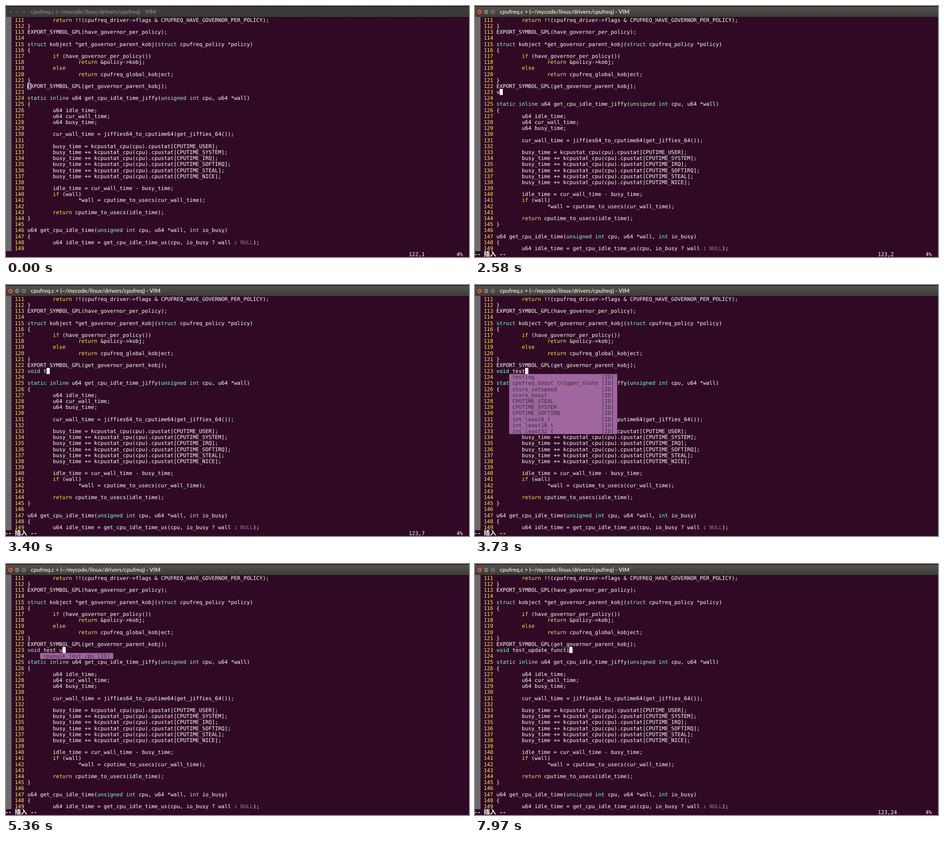
Recreate the animation shown at these times as an HTML page with a canvas. Size 1016x551 px, loop 8 s.

```html
<!DOCTYPE html>
<html lang="en">
<head>
<meta charset="utf-8">
<title>Editor session</title>
<style>
html, body { margin: 0; width: 100%; height: 100%; overflow: hidden; background: #300a24; }
canvas { display: block; }
</style>
</head>
<body>
<canvas id="stage" width="1016" height="551"></canvas>
<script>
const ctx = document.getElementById('stage').getContext('2d');
const LOOP = 8000, W = 1016, H = 551;
const CELL = 6.975, ROW = 13.184, LEFT = -1.8, TOP = 24, BASE = 10.9;
const TEXT_COL = 7, STATUS_ROW = 39, OPEN_AT = 1700;
const MONO = '11.585px "DejaVu Sans Mono", monospace';
const C = {
  bg: '#300a24', fg: '#ffffff', number: '#fce94f', keyword: '#fce94f',
  type: '#87ffcf', constant: '#9a6c9c', sign: '#6c6c6c',
  menu: '#a066a0', menuText: '#352c3a'
};

const code = `        return !!(cpufreq_driver->flags & CPUFREQ_HAVE_GOVERNOR_PER_POLICY);
}
EXPORT_SYMBOL_GPL(have_governor_per_policy);

struct kobject *get_governor_parent_kobj(struct cpufreq_policy *policy)
{
        if (have_governor_per_policy())
                return &policy->kobj;
        else
                return cpufreq_global_kobject;
}
EXPORT_SYMBOL_GPL(get_governor_parent_kobj);

static inline u64 get_cpu_idle_time_jiffy(unsigned int cpu, u64 *wall)
{
        u64 idle_time;
        u64 cur_wall_time;
        u64 busy_time;

        cur_wall_time = jiffies64_to_cputime64(get_jiffies_64());

        busy_time = kcpustat_cpu(cpu).cpustat[CPUTIME_USER];
        busy_time += kcpustat_cpu(cpu).cpustat[CPUTIME_SYSTEM];
        busy_time += kcpustat_cpu(cpu).cpustat[CPUTIME_IRQ];
        busy_time += kcpustat_cpu(cpu).cpustat[CPUTIME_SOFTIRQ];
        busy_time += kcpustat_cpu(cpu).cpustat[CPUTIME_STEAL];
        busy_time += kcpustat_cpu(cpu).cpustat[CPUTIME_NICE];

        idle_time = cur_wall_time - busy_time;
        if (wall)
                *wall = cputime_to_usecs(cur_wall_time);

        return cputime_to_usecs(idle_time);
}

u64 get_cpu_idle_time(unsigned int cpu, u64 *wall, int io_busy)
{
        u64 idle_time = get_cpu_idle_time_us(cpu, io_busy ? wall : NULL);
`.split('\n');

// Time of each key press, one per typed character
const typed = 'void test_update_functi';
const keys = [2530, 2730, 2840, 2910, 2980, 3400, 3480, 3600, 3670, 4430, 5310, 5410,
  5470, 5520, 5710, 5760, 6450, 6770, 6850, 7010, 7130, 7680, 7970];

const blinkOff = [[1500, 1700], [2320, 2530], [4980, 5310]];

const menus = [
  { from: 2780, to: 2980, col: 0, items: ['void'] },
  { from: 3530, to: 4470, col: 5, items: ['testing', 'cpufreq_boost_trigger_state',
    'store_setspeed', 'store_boost', 'CPUTIME_STEAL', 'CPUTIME_SYSTEM', 'CPUTIME_SOFTIRQ',
    'int_least8_t', 'int_least16_t', 'int_least32_t'] },
  { from: 4470, to: 5360, col: 5, items: ['cpumask_test_cpu', 'int_least8_t',
    'int_least16_t', 'int_least32_t', 'int_least64_t', 'uint_least8_t', 'uint_least16_t',
    'uint_least32_t', 'uint_least64_t', 'cpufreq_update_suspend_to_state_table'] },
  { from: 5360, to: 5410, col: 5, items: ['cpumask_test_cpu'] }
];

const colX = col => LEFT + col * CELL;
const rowY = row => TOP + row * ROW;
const within = (t, from, to) => t >= from && t < to;

function rect(x, y, w, h, color) {
  ctx.fillStyle = color;
  ctx.fillRect(x, y, w, h);
}

function put(text, col, row, color, font = MONO) {
  ctx.font = font;
  ctx.fillStyle = color;
  ctx.fillText(text, colX(col), rowY(row) + BASE);
}

function tokenColor(word) {
  if (/^(return|if|else)$/.test(word)) return C.keyword;
  if (/^(struct|static|inline|unsigned|int|void)$/.test(word)) return C.type;
  return word === 'NULL' ? C.constant : C.fg;
}

function drawCode(text, row) {
  put(String(111 + row), 3, row, C.number);
  for (const m of text.matchAll(/\w+|[^\w\s]+/g))
    put(m[0], TEXT_COL + m.index, row, tokenColor(m[0]));
}

function disc(x, y, r, fill, stroke) {
  ctx.beginPath();
  ctx.arc(x, y, r, 0, Math.PI * 2);
  ctx.fillStyle = fill;
  ctx.fill();
  ctx.lineWidth = 1;
  ctx.strokeStyle = stroke;
  ctx.stroke();
}

function path(points, color, width = 1) {
  ctx.beginPath();
  points.forEach(([x, y, move]) => move ? ctx.moveTo(x, y) : ctx.lineTo(x, y));
  ctx.lineWidth = width;
  ctx.strokeStyle = color;
  ctx.stroke();
}

function drawTitle(focused, modified) {
  const g = ctx.createLinearGradient(0, 0, 0, TOP);
  g.addColorStop(0, focused ? '#56544d' : '#3e3d39');
  g.addColorStop(1, focused ? '#3d3c38' : '#3a3935');
  rect(0, 0, W, TOP, g);
  rect(0, 0, W, 1.5, '#1f0e1a');

  const mark = focused ? '#3a3833' : '#55524b';
  const edge = focused ? '#34332f' : '#2c2b28';
  const gray = focused ? '#85827a' : '#403f3a';
  disc(10, 13, 5.5, focused ? '#e65f35' : gray, edge);
  disc(24.5, 13, 5.5, gray, edge);
  disc(39, 13, 5.5, gray, edge);
  path([[8, 11, 1], [12, 15], [12, 11, 1], [8, 15]], mark, 1.2);
  path([[22, 13, 1], [27, 13]], mark, 1.2);
  ctx.strokeRect(37, 11, 4, 4);

  ctx.font = 'bold 12.4px Lato, sans-serif';
  ctx.fillStyle = focused ? '#dfdbd2' : '#85817a';
  ctx.fillText(`cpufreq.c ${modified ? '+ ' : ''}(~/mycode/linux/drivers/cpufreq) - VIM`, 54.5, 17.2);
}

function drawMenu(menu) {
  const longest = Math.max(...menu.items.map(s => s.length));
  const col = TEXT_COL + menu.col;
  rect(colX(col - 1), rowY(13), (longest + 7) * CELL, menu.items.length * ROW, C.menu);
  menu.items.forEach((item, i) => {
    put(item, col, 13 + i, C.menuText);
    put('[ID]', col + longest + 1, 13 + i, C.menuText);
  });
}

function drawCursor(col, row, char, focused) {
  const x = Math.round(colX(TEXT_COL + col)), y = Math.round(rowY(row));
  if (focused) {
    rect(x, y, 7, 13.4, C.fg);
    if (char) put(char, TEXT_COL + col, row, C.bg);
  } else {
    ctx.strokeStyle = C.fg;
    ctx.lineWidth = 1;
    ctx.strokeRect(x + 0.5, y + 0.5, 7, 13);
  }
}

function drawPointer(t) {
  const p = Math.min(1, (t - 550) / 330);
  const rest = (1 - p) ** 2;
  const x = Math.round(372 + 40 * rest) - 0.5, y = Math.round(433 + 118 * rest);
  path([[x - 3, y - 6, 1], [x - 1, y - 6], [x, y - 5], [x, y + 5], [x - 1, y + 6], [x - 3, y + 6],
    [x + 3, y - 6, 1], [x + 1, y - 6], [x, y - 5], [x, y + 5, 1], [x + 1, y + 6], [x + 3, y + 6]], '#b9aeb6');
}

function draw(t) {
  const focused = t >= 690, editing = t >= OPEN_AT;
  const count = keys.filter(k => t >= k).length;
  const menu = menus.find(m => within(t, m.from, m.to));
  const lines = code.slice();
  if (editing) lines.splice(12, 0, typed.slice(0, count));

  rect(0, 0, W, H, C.bg);
  rect(0, TOP, colX(2), 39 * ROW, C.sign);
  lines.slice(0, 39).forEach(drawCode);
  drawTitle(focused, t >= 1740);

  if (menu) drawMenu(menu);
  if (!blinkOff.some(([a, b]) => within(t, a, b)))
    drawCursor(editing ? count : 0, editing ? 12 : 11, editing ? '' : 'E', focused);

  if (editing) {
    put('--', 0, STATUS_ROW, C.fg, 'bold ' + MONO);
    put('插入', 3, STATUS_ROW, C.fg, 'bold 13.6px "Noto Sans CJK SC", "Noto Sans CJK", sans-serif');
    put('--', 8, STATUS_ROW, C.fg, 'bold ' + MONO);
  }
  if (!menu) {
    put(editing ? `123,${count + 1}` : '122,1', 127, STATUS_ROW, C.fg);
    put('4%', 142, STATUS_ROW, C.fg);
  }
  if (within(t, 550, OPEN_AT)) drawPointer(t);
}

ctx.textRendering = 'geometricPrecision';
const start = performance.now();
function tick() {
  draw((performance.now() - start) % LOOP);
  requestAnimationFrame(tick);
}
tick();
</script>
</body>
</html>
```
